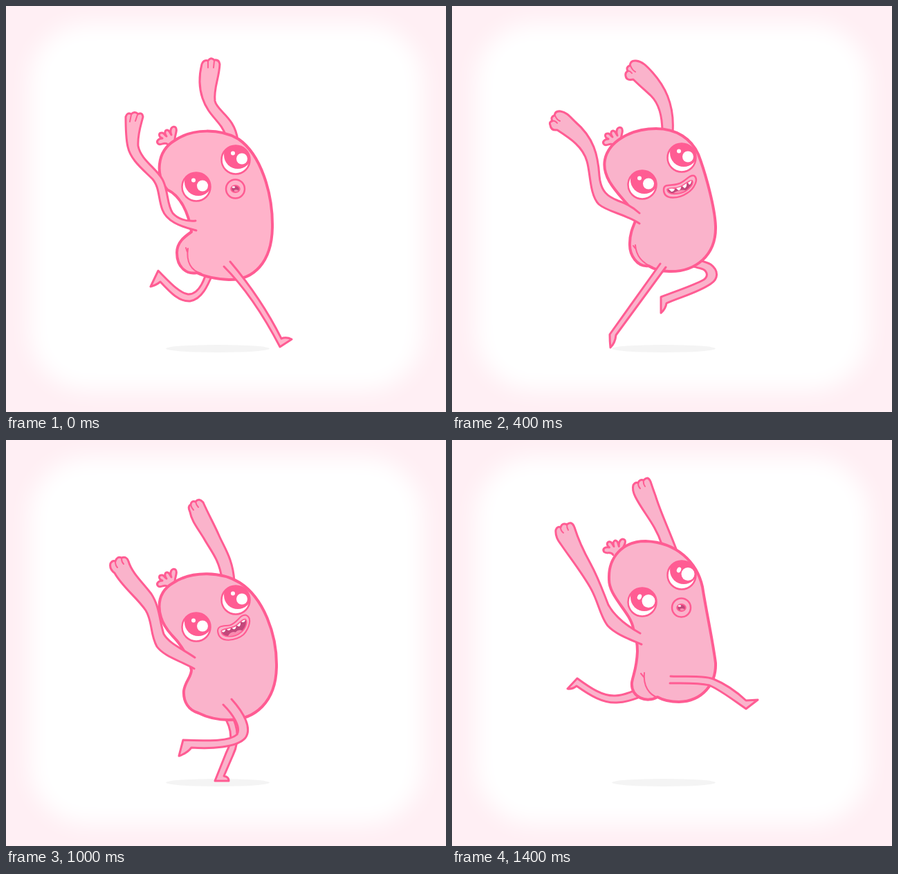
Animation, 636 px wide and 586 px high, one loop 1600 ms. Source, as an HTML page:

```html
<!DOCTYPE html>
<html lang="en">
<head>
<meta charset="utf-8">
<title>Skipping sausage</title>
<style>
html, body { margin: 0; width: 100%; height: 100%; overflow: hidden; background: #ffeff4; }
.glow { position: absolute; left: 34px; top: 25px; right: 33px; bottom: 31px; border-radius: 85px; background: #fff; filter: blur(16px); }
svg { position: absolute; left: 0; top: 0; width: 636px; height: 586px; }
.pose { visibility: hidden; stroke: #ff5c93; stroke-width: 3; stroke-linecap: round; stroke-linejoin: round; }
.body { stroke-width: 4; }
.line { fill: none; stroke-width: 2; }
.thin { stroke-width: 2.5; }
.white { fill: #fff; stroke: none; }
.iris { fill: #ff5c93; stroke: none; }
.dark { fill: #c2487b; stroke-width: 2; }
.tongue { fill: #f98bb0; stroke: none; }
</style>
</head>
<body>
<div class="glow"></div>
<svg viewBox="0 0 636 586">
  <defs>
    <clipPath id="eyeClip"><circle r="20"/></clipPath>
    <clipPath id="mouthClip"><path d="M307,267C310,262 320,264 330,259C338,255 342,246 348,247C352,250 350,261 342,268C330,279 308,280 307,267Z"/></clipPath>
  </defs>
  <ellipse cx="306" cy="494.5" rx="75" ry="5.5" fill="#f4f4f4"/>
  <g id="stage"></g>
</svg>
<script>
const STEP = 200;
const PINK = '#fab3cb', BRIGHT = '#ffb3ca';

// Arms, face height and knot placement for each phase of the skip
const phases = {
  reach: {
    back: 'M318,188C311,166 293,160 284,133C279,118 279,100 283,84Q286,77 292,79Q296,73 301,78Q308,77 309,84C308,105 300,118 302,137C305,152 331,160 335,194',
    front: 'M275,324C250,318 232,310 226,294C220,278 222,262 212,250C197,235 180,222 176,203C173,190 173,175 173,160Q175,153 181,156Q186,151 191,156Q197,153 198,160C195,172 190,185 191,202C195,222 217,234 226,250C235,266 232,286 241,299C249,308 260,311 274,310',
    fingers: 'M292,80L292,89M301,79L300,89M181,157L179,167M190,157L187,166',
    eyeY: 261, knot: ''
  },
  dip: {
    back: 'M312,200C308,172 296,160 286,142C276,126 268,116 266,104Q262,96 267,93Q268,87 274,89Q279,83 285,90C292,106 302,124 308,138C316,156 328,172 330,204',
    front: 'M272,330C250,318 228,312 218,298C208,280 212,262 202,246C190,228 168,212 157,192Q149,186 151,178Q154,173 158,175Q161,167 167,170Q174,167 177,175C182,192 198,206 210,222C222,240 222,262 228,280C236,294 256,302 273,314',
    fingers: 'M267,93Q268,98 271,101M274,89Q275,94 278,97M158,175Q158,181 161,184M167,171Q167,176 170,179',
    eyeY: 270, knot: 'translate(0 12)'
  },
  push: {
    back: 'M304,182C304,155 298,140 288,130C276,119 268,112 262,106Q252,108 251,101Q250,96 254,94Q251,88 257,86Q258,78 266,79C275,80 281,86 290,96C306,114 322,140 319,182',
    front: 'M271,314C250,300 224,297 212,286C199,273 200,240 195,224C189,203 172,192 152,179Q143,180 142,172Q140,167 145,166Q142,160 148,158Q149,151 157,152C165,153 170,159 178,167C205,190 211,215 213,245C215,268 225,275 240,281Q258,287 271,299',
    fingers: 'M254,94Q257,93 260,97M258,86Q260,92 265,95M145,166Q149,165 152,169M149,158Q151,164 156,166',
    eyeY: 258, knot: 'translate(0 1)'
  },
  leap: {
    back: 'M303,150C294,122 276,104 265,82Q260,72 262,65Q265,60 269,62Q271,56 277,58Q283,51 287,60C289,66 291,72 294,80C302,106 314,130 325,160',
    front: 'M274,295C255,287 236,280 225,268C214,254 212,235 201,215C188,192 172,172 157,150Q149,140 150,130Q152,124 157,126Q159,119 166,122Q173,116 177,126C182,142 190,160 200,178C212,200 218,218 226,238C236,256 254,269 272,279',
    fingers: 'M269,62Q269,67 272,70M277,58Q276,63 279,67M157,126Q157,131 161,134M166,122Q166,127 168,130',
    eyeY: 234, knot: 'translate(2 -34) rotate(15 233 188)', big: true
  }
};

const reachTop = 'M233,265C216,245 217,210 244,194C270,176 310,177 336,192C368,214 386,270 385,320C384,370 358,396 322,395C304,394 288,391 276,385';
const reachEnd = 'C264,298 252,274 233,265Z';
const pushTop = 'M255,288C240,270 216,248 221,222C226,196 258,177 295,177C325,177 346,192 356,214C366,240 380,290 381,318C382,360 352,384 314,383C304,383 292,380 284,375';
const dipBody = 'M240,282C216,256 214,222 242,206C270,188 312,190 338,206C372,228 392,280 391,328C390,378 360,404 322,404C304,404 290,400 278,394';
const dipEnd = 'C264,314 254,296 240,282Z';

const legs = {
  plant: 'M315,376C345,406 372,446 396,492L413,481Q405,477 398,480C378,440 352,402 324,369',
  trail: 'M293,374C288,392 280,417 263,416C250,414 236,398 220,382L209,405Q217,403 223,398C238,414 250,427 266,426C285,423 293,400 302,379',
  stand: 'M306,384C326,412 330,430 318,452L302,492L322,492Q322,486 315,485L328,455C340,430 334,408 318,380',
  pass: 'M326,374C344,394 356,416 346,430C334,444 296,446 268,444Q262,452 250,456L256,433C290,434 322,436 334,425C340,414 328,396 314,382',
  toe: 'M301,372L228,474Q228,485 229,493Q236,486 237,475L309,377',
  knee: 'M322,357C340,364 362,366 374,373C386,382 385,394 374,401C355,414 330,420 310,429Q309,437 302,443L302,420C325,411 350,403 364,395C372,389 368,381 360,379C345,375 330,372 319,367',
  kick: 'M297,345C275,356 255,368 236,369C218,370 200,358 181,344L167,359Q174,360 180,355C200,369 218,380 238,379C262,378 282,366 300,357',
  farStep: 'M370,336C400,328 412,344 447,367L465,366L448,380C425,362 400,340 370,344',
  nearStep: 'M316,341C345,342 365,340 378,345C395,352 410,362 425,376L442,375L425,388C410,378 390,362 372,354C355,350 335,351 315,351'
};

const poses = [
  { phase: 'reach', fill: BRIGHT, near: 'plant', far: 'trail', mouth: 'round',
    body: reachTop + 'C262,388 247,378 247,356C247,341 258,333 268,326' + reachEnd,
    crack: 'M263,350C260,370 268,382 282,386M260,349L262,355' },
  { phase: 'dip', near: 'stand', far: 'pass', mouth: [330, 272, .6],
    body: dipBody + 'C262,396 249,386 250,366C251,350 262,342 268,334' + dipEnd,
    crack: 'M264,358C261,376 270,390 284,395M261,358L263,364' },
  { phase: 'push', near: 'toe', far: 'knee', mouth: 'grin',
    body: pushTop + 'C268,377 256,360 257,342C257,328 262,318 266,308Z',
    crack: 'M265,345C266,360 275,371 290,377M262,346L265,350' },
  { phase: 'leap', near: 'kick', far: 'farStep', mouth: [329, 238.5, .91],
    body: 'M262,272C256,246 224,226 225,192C228,160 258,142 286,142C325,144 356,176 363,212C370,252 379,284 381,314C382,350 362,374 334,376C314,379 294,378 282,370C268,362 264,342 269,325C273,312 269,290 262,272Z' },
  { phase: 'reach', near: 'trail', far: 'plant', mouth: [328, 261.5, 1],
    body: reachTop + 'C266,378 257,364 257,350C259,338 268,334 268,322' + reachEnd },
  { phase: 'dip', near: 'pass', far: 'stand', mouth: [329, 271, .85],
    body: dipBody + 'C264,390 256,378 257,362C259,348 268,342 268,332' + dipEnd },
  { phase: 'push', near: 'knee', far: 'toe', mouth: [330.5, 262, .71],
    body: pushTop + 'C262,380 250,366 251,348C252,332 262,322 266,308Z',
    crack: 'M263,338C260,358 268,372 284,376M259,339L263,347' },
  { phase: 'leap', near: 'nearStep', far: 'kick', mouth: 'round',
    body: 'M262,272C258,248 226,226 227,200C226,170 246,146 280,146C325,148 354,176 362,212C368,250 377,290 381,322C382,352 362,377 328,378C316,378 306,376 297,371C282,380 258,372 260,350C262,338 267,330 268,305Q268,288 262,272Z',
    crack: 'M278,336C276,355 285,368 298,372M273,337L278,343' }
];

const path = (d, cls = '') => d ? `<path class="${cls}" d="${d}"/>` : '';

function eye(x, y, big) {
  const glint = big
    ? '<ellipse class="white" cx="-4" cy="-7.5" rx="3" ry="4" transform="rotate(25 -4 -7.5)"/>'
    : '<circle class="white" cx="-4" cy="-9.5" r="3"/>';
  return `<g transform="translate(${x} ${y})"><circle class="white" r="20.5"/>
    <circle class="iris" cx="3" cy="-7" r="20" clip-path="url(#eyeClip)"/>
    <circle class="white" cx="9" cy="-1.5" r="${big ? 9.5 : 8}"/>${glint}
    <circle class="thin" fill="none" r="20.5"/></g>`;
}

function mouth(kind, eyeY) {
  if (kind === 'round') {
    return `<g transform="translate(331.5 ${eyeY + (eyeY < 240 ? 8 : 3)})"><circle class="thin" r="13.5"/>
      <ellipse class="dark" rx="6.3" ry="5"/>
      <ellipse class="white" cx="-2.5" cy="-2.5" rx="2.2" ry="1.3"/>
      <ellipse class="tongue" cx="1" cy="2.5" rx="3" ry="1.5"/></g>`;
  }
  if (kind === 'grin') {
    return path('M306,265C306,256 316,260 326,257C338,254 342,243 350,245C357,250 350,264 340,270C328,278 306,281 306,265Z', 'thin')
      + path('M311,265C313,261 322,265 330,261C338,258 342,251 347,252C350,256 344,263 338,267C328,272 312,274 311,265Z', 'dark')
      + path('M313,264Q318,263 322,264Q321,268 317,268ZM324,263L331,261Q331,266 327,266ZM333,260L339,256Q340,261 336,263ZM341,255L346,252Q346,257 343,258Z', 'white')
      + path('M320,270Q329,264 338,266Q330,271 320,270Z', 'tongue');
  }
  const [x, y, s] = kind;
  return `<g transform="translate(${x} ${y}) scale(${s}) translate(-328 -261.5)">`
    + path('M301,267C301,257 312,259 322,257C336,252 338,239 349,240C360,244 355,262 345,273C334,283 303,290 301,267Z', 'thin')
    + '<g clip-path="url(#mouthClip)">'
    + path('M300,240H360V290H300Z', 'dark')
    + path('M318,277Q322,267 331,269Q338,262 345,268L338,280Z', 'tongue')
    + path('M306,261H314Q315,268 311,269Q308,269 306,265ZM315,260L323,259Q324,265 320,266Q316,266 315,260ZM324,258L332,256Q333,263 329,264Q325,264 324,258ZM333,255L339,250Q341,257 338,259Q334,260 333,255ZM340,249L347,244Q349,251 345,252Q342,253 340,249Z', 'white')
    + '</g>'
    + path('M307,267C310,262 320,264 330,259C338,255 342,246 348,247C352,250 350,261 342,268C330,279 308,280 307,267Z', 'line')
    + '</g>';
}

const knot = 'M234,200C229,195 225,202 220,199C216,195 221,191 226,191C219,188 221,182 226,183C229,184 230,187 232,188C227,181 232,176 236,181L239,186C236,178 240,172 245,175C249,179 243,187 244,196';

function draw(p) {
  const a = phases[p.phase];
  return `<g class="pose" fill="${p.fill || PINK}">`
    + path(a.back) + path(legs[p.far])
    + `<g transform="${a.knot}">${path(knot)}</g>`
    + path(p.body, 'body') + path(p.crack, 'line') + path(legs[p.near])
    + eye(275, a.eyeY, a.big) + eye(332, a.eyeY - 39, a.big) + mouth(p.mouth, a.eyeY)
    + path(a.front) + path(a.fingers, 'line') + '</g>';
}

const stage = document.getElementById('stage');
stage.innerHTML = poses.map(draw).join('');
const figures = [...stage.children];
const start = performance.now();

function tick(now) {
  const i = Math.floor(Math.max(0, now - start) / STEP) % figures.length;
  figures.forEach((g, k) => { g.style.visibility = k === i ? 'visible' : 'hidden'; });
  requestAnimationFrame(tick);
}
tick(start);
</script>
</body>
</html>
```
